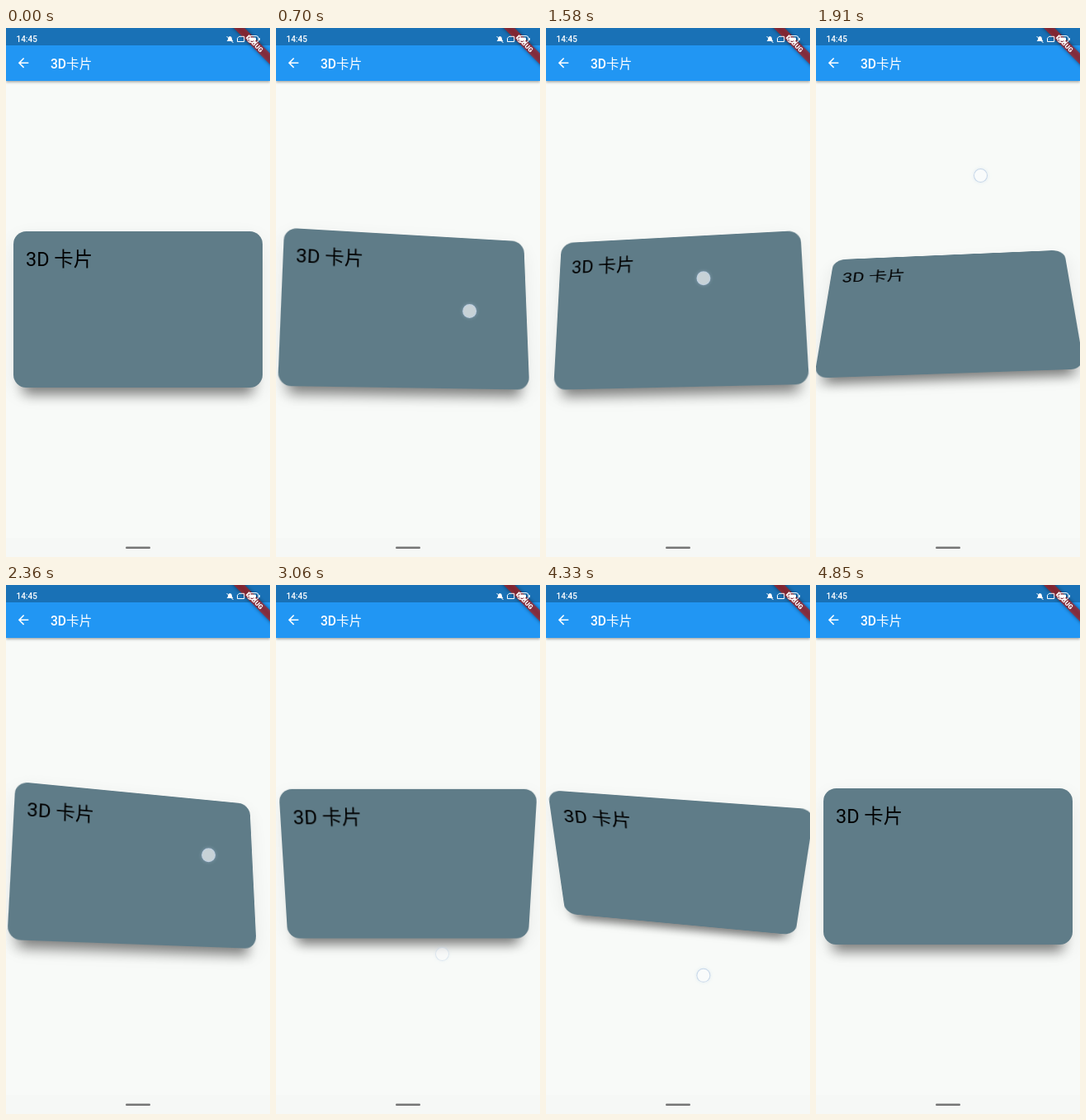
Recreate the animation shown at these times as an HTML page. Size 320 px wide and 640 px high, loop 4910 ms.

```html
<!DOCTYPE html>
<html lang="zh">
<head>
<meta charset="utf-8">
<style>
  html, body { margin: 0; width: 100%; height: 100%; overflow: hidden; }
  body { position: relative; background: #f8faf8; font-family: Roboto, "Noto Sans CJK SC", "Noto Sans CJK", sans-serif; }
  body > * { position: absolute; }
  #bar { left: 0; top: 0; width: 320px; height: 63.5px; background: #2196f3; box-shadow: 0 1.5px 3px rgba(0,0,0,.35); }
  #status { left: 0; top: 0; width: 320px; height: 21px; background: #1971b6; }
  #chrome { left: 0; top: 0; }
  #nav { left: 0; top: 617px; width: 320px; height: 23px; background: #f6f8f6; }
  #card {
    left: 9px; top: 246px; width: 302px; height: 189px; border-radius: 15.5px;
    background: #5f7c88;
    box-shadow: 0 20px 15px -12px rgba(0,0,0,.48), 0 8px 24px rgba(0,0,0,.07);
  }
  #card span { position: absolute; left: 15px; top: 20px; font-size: 23.4px; line-height: 28px; white-space: nowrap; color: #000; }
  #touch {
    left: -8.5px; top: -8.5px; width: 17px; height: 17px; border-radius: 50%; box-sizing: border-box;
    background: rgba(250,251,252,.68); border: 1px solid rgba(190,208,230,.85);
    box-shadow: 0 0 4px rgba(190,215,235,.4);
  }
</style>
</head>
<body>
<div id="nav"></div>
<div id="bar"></div>
<div id="status"></div>
<div id="card"><span>3D 卡片</span></div>
<svg id="chrome" width="320" height="640" fill="#fff">
  <g transform="translate(320 0) rotate(45)">
    <rect x="-40" y="21.8" width="80" height="9.3" fill="#000" opacity=".5" style="filter:blur(2px)"/>
    <rect x="-40" y="21.8" width="80" height="9.3" fill="#b71c1c" fill-opacity=".68"/>
    <text x="0" y="29.3" font-size="8" font-weight="900" text-anchor="middle">DEBUG</text>
  </g>
  <text x="12.5" y="17.3" font-size="10" font-weight="500">14:45</text>
  <text x="54" y="49.4" font-size="15.6" font-weight="500">3D卡片</text>
  <path transform="translate(11.7 32.8) scale(.78)" d="M20 11H7.83l5.59-5.59L12 4l-8 8 8 8 1.41-1.41L7.83 13H20z"/>
  <path d="M267.5 16q1.7-1.3 1.7-3.5 0-2.5 2.3-2.5t2.3 2.5q0 2.200 1.700 3.500z"/>
  <g fill="none" stroke="#fff">
    <path d="M267.500 10l8 8"/>
    <path d="M282.500 10.300h6.200v6.200h-8.200v-4.200z"/>
    <rect x="293" y="9.500" width="13" height="8" rx="3"/>
  </g>
  <rect x="295" y="11.500" width="8" height="4" rx="1"/>
  <rect x="306.500" y="12" width="1.300" height="3"/>
  <rect x="145" y="627.500" width="30" height="2.400" rx="1.200" fill="#757575"/>
</svg>
<div id="touch"></div>
<script>
const LOOP = 4910;
const card = document.getElementById('card');
const touch = document.getElementById('touch');

// time, finger x, finger y, tilt about x, tilt about y (degrees)
const keys = [
  [0, 208, 371, 0, 0], [200, 208, 371, 0, 0], [550, 228, 370, -1, -8],
  [850, 238, 315, -22, -12], [1210, 241, 380, 4, -15], [1500, 190, 330, -10, 8],
  [1910, 199, 178, -41, 3.4], [2360, 245, 326, -15, -14.7], [2700, 230, 400, 12, -8],
  [2960, 201, 446, 32, 3], [3060, 201, 446, 17.5, 0], [3260, 201, 446, 0, 0],
  [3340, 212, 360, 0, 0], [3730, 202, 435, 34, 4.5], [3950, 198, 466, 42, 5],
  [4400, 190, 472, 36, 8], [4850, 190, 472, 0, 0], [LOOP, 190, 472, 0, 0]
];
const presses = [[120, 2990], [3330, 4410]];

const slope = (i, c) => (keys[i + 1][c] - keys[i][c]) / (keys[i + 1][0] - keys[i][0]);

// Monotone tangent: flat at turning points, harmonic mean elsewhere
function tangent(i, c) {
  if (i === 0 || i === keys.length - 1) return 0;
  const a = slope(i - 1, c), b = slope(i, c);
  return a * b > 0 ? 2 * a * b / (a + b) : 0;
}

function valueAt(t, c) {
  const i = keys.findIndex(k => k[0] > t) - 1;
  const [p, q] = [keys[i], keys[i + 1]];
  const span = q[0] - p[0], u = (t - p[0]) / span, v = 1 - u;
  return p[c] * (1 + 2 * u) * v * v + q[c] * (1 + 2 * v) * u * u
    + span * u * v * (tangent(i, c) * v - tangent(i + 1, c) * u);
}

const clamp = n => Math.max(0, Math.min(1, n));
const touchOpacity = t => Math.max(...presses.map(
  ([down, up]) => clamp((t - down) / 60) * clamp(1 - (t - up) / 150)));

function draw(now) {
  const t = now % LOOP;
  const [x, y, tiltX, tiltY] = [1, 2, 3, 4].map(c => valueAt(t, c));
  card.style.transform =
    `matrix3d(1,0,0,0, 0,1,0,0, 0,0,1,.0013, 0,0,0,1) rotateX(${tiltX}deg) rotateY(${tiltY}deg)`;
  touch.style.transform = `translate(${x}px, ${y}px)`;
  touch.style.opacity = touchOpacity(t);
  requestAnimationFrame(() => draw(performance.now() - start));
}
const start = performance.now();
draw(0);
</script>
</body>
</html>
```
